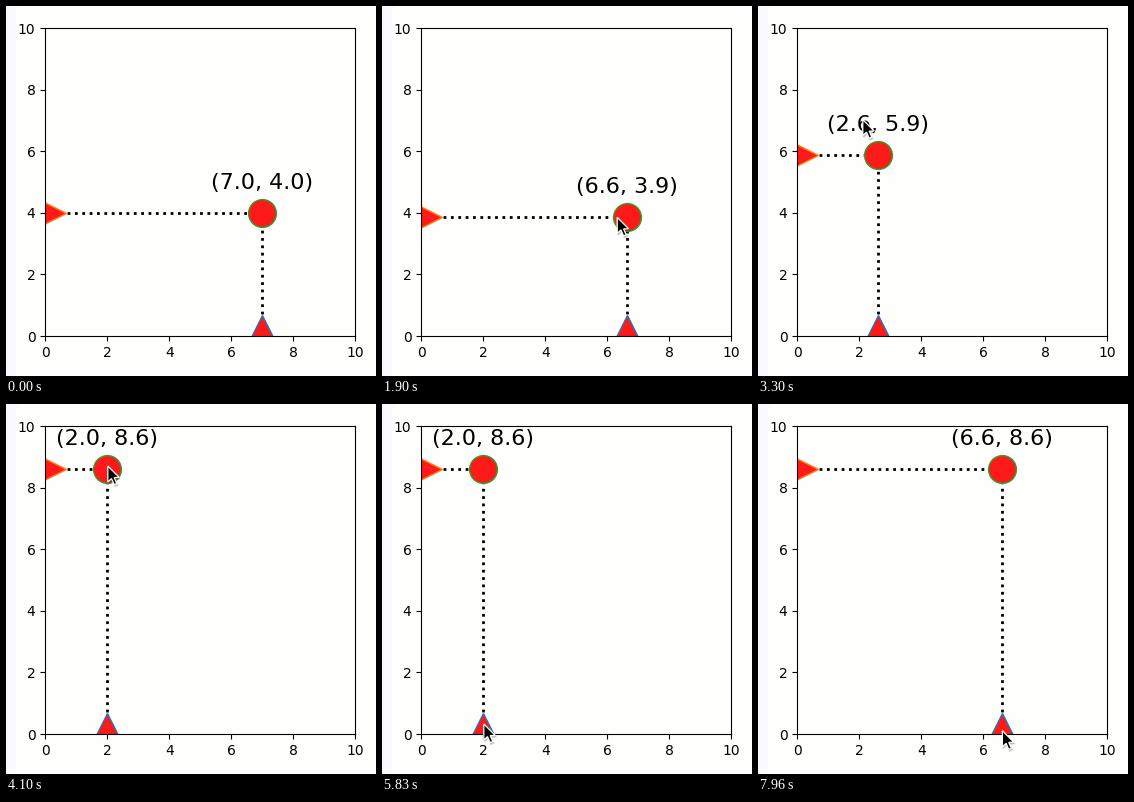
A matplotlib script for the animation above (8 s loop, 370x370 px).

```python
import numpy as np
import matplotlib.pyplot as plt
from matplotlib.animation import FuncAnimation
from matplotlib.patches import FancyBboxPatch, Polygon

SIZE, DPI = 370, 100
FRAMES, INTERVAL = 250, 32
RED, PAPER, MARGIN = "#ff1a1a", "#fefefd", "#f9f9fe"
LEFT, BOTTOM, WIDTH, HEIGHT = 39.2, 40, 310, 307.8
PIXELS_PER_UNIT = np.array([WIDTH / 10, -HEIGHT / 10])

# The dot trails the pointer between grab and release; later the lower
# handle is grabbed and moves the dot sideways only.
START = np.array([7.0, 4.0])
GRAB, RELEASE, LAG = 1460, 3630, 130
GRAB_HANDLE = 6800

# Pointer path: time in ms, x, y in pixels
PATH = np.array([
    (630, 375, 249), (1060, 270, 208), (1260, 257, 204),
    (GRAB, 257, 204), (2380, 185.3, 219.5), (2500, 163, 212),
    (3180, 121.2, 146.4), (3300, 105, 116), (RELEASE, 101.8, 62),
    (4530, 101.8, 62), (4800, 123, 130), (5200, 110, 284),
    (5500, 70, 251), (5830, 101.8, 320),
    (GRAB_HANDLE, 101.8, 320), (7060, 123, 322), (8000, 251, 327)])

ARROW = np.array([(0, 0), (0, 16), (3.7, 12.6), (6.4, 18.6), (9, 17.5),
                  (6.4, 11.6), (11.4, 11.4)])


def smooth_track(keys):
    """Monotone cubic path through the keys; holds stay still."""
    times, values = keys[:, 0], keys[:, 1:]
    slopes = np.diff(values, axis=0) / np.diff(times)[:, None]
    before, after = slopes[:-1], slopes[1:]
    same_way = before * after > 0
    total = np.where(same_way, before + after, 1)
    inner = np.where(same_way, 2 * before * after / total, 0)
    tangents = np.vstack([slopes[:1], inner, slopes[-1:]])

    def at(t):
        t = np.clip(t, times[0], times[-1] - 1)
        i = np.searchsorted(times, t, side="right") - 1
        h = times[i + 1] - times[i]
        s = (t - times[i]) / h
        return (values[i] * (1 + 2 * s) * (1 - s) ** 2
                + values[i + 1] * s ** 2 * (3 - 2 * s)
                + h * tangents[i] * s * (1 - s) ** 2
                + h * tangents[i + 1] * s ** 2 * (s - 1))
    return at


pointer_at = smooth_track(PATH)


def travel(since, until):
    """Pointer displacement in data units."""
    return (pointer_at(until) - pointer_at(since)) / PIXELS_PER_UNIT


def point_at(t):
    x, y = START + travel(GRAB, np.clip(t - LAG, GRAB, RELEASE))
    return x + travel(GRAB_HANDLE, max(t, GRAB_HANDLE))[0], y


def pixel_layer(zorder):
    layer = fig.add_axes([0, 0, 1, 1], zorder=zorder)
    layer.set(xlim=(0, SIZE), ylim=(SIZE, 0))
    layer.axis("off")
    return layer


def handle(marker, size, edge):
    return ax.plot([0], [0], marker, ms=size, mfc=RED, mec=edge, zorder=2.2)[0]


plt.rcParams["font.family"] = "DejaVu Sans"
fig = plt.figure(figsize=(SIZE / DPI, SIZE / DPI), dpi=DPI, facecolor=MARGIN)

back = pixel_layer(0)
back.add_patch(FancyBboxPatch((10, 0), 400, 400, fc=PAPER, ec="none",
                              boxstyle="round,pad=0,rounding_size=6"))

ax = fig.add_axes([v / SIZE for v in (LEFT, BOTTOM, WIDTH, HEIGHT)],
                  zorder=1, facecolor="none")
ax.set(xlim=(0, 10), ylim=(0, 10), xticks=range(0, 11, 2),
       yticks=range(0, 11, 2))
h_line, = ax.plot([], [], "k:", lw=2)
v_line, = ax.plot([], [], "k:", lw=2)
x_handle = handle("^", 30, "C0")
y_handle = handle(">", 30, "C1")
dot = handle("o", 20, "C2")
label = ax.text(0, 0, "", fontsize=16, ha="center", va="baseline")

front = pixel_layer(2)
shadow = front.add_patch(Polygon(ARROW, fc="black", ec="black", lw=1.2,
                                 alpha=0.15))
pointer = front.add_patch(Polygon(ARROW, fc="black", ec="white", lw=0.9,
                                  joinstyle="miter"))


def draw(frame):
    t = (frame + 0.5) * INTERVAL
    x, y = point_at(t)
    h_line.set_data([0, x], [y, y])
    v_line.set_data([x, x], [0, y])
    x_handle.set_data([x], [0])
    y_handle.set_data([0], [y])
    dot.set_data([x], [y])
    label.set_position((x, y + 0.78))
    label.set_text(f"({x:.1f}, {y:.1f})")
    tip = pointer_at(t)
    pointer.set_xy(ARROW + tip)
    shadow.set_xy(ARROW + tip + (0.8, 1.6))
    for patch in (pointer, shadow):
        patch.set_visible(t > PATH[0, 0])
    return h_line, v_line, x_handle, y_handle, dot, label, shadow, pointer


anim = FuncAnimation(fig, draw, frames=FRAMES, interval=INTERVAL,
                     repeat=True, repeat_delay=0, blit=False)
plt.show()
```
